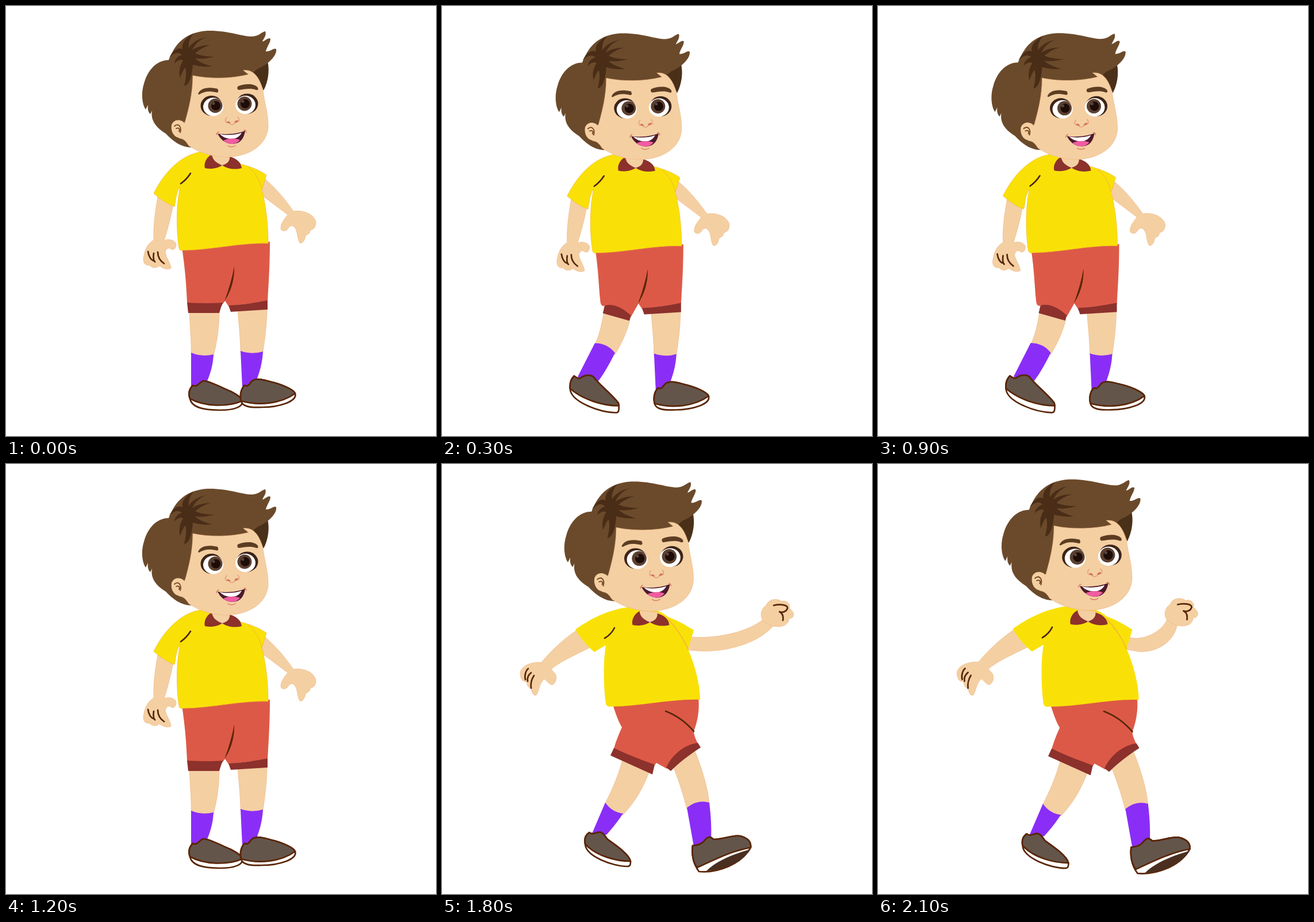
Animation, 748 px wide and 748 px high, one loop 2.4 s. Source, as an HTML page:

```html
<!DOCTYPE html>
<html lang="en">
<head>
<meta charset="utf-8">
<title>Walking boy</title>
<style>
html, body { margin: 0; width: 100%; height: 100%; overflow: hidden; background: #fff; }
svg { display: block; width: 100vw; height: 100vh; }
</style>
</head>
<body>
<svg id="stage" viewBox="0 0 748 748"></svg>
<script>
const SKIN = '#f4cfa2', HAIR = '#6b4a2b', DARK = '#4a2d17', SHIRT = '#f9e107',
  SHORTS = '#dd5947', CUFF = '#8c312c', SOCK = '#8a2ef7', LINE = '#5a2607';

const fill = (color, d, extra = '') => `<path fill="${color}" d="${d}" ${extra}/>`;
const line = (color, width, d) =>
  `<path fill="none" stroke="${color}" stroke-width="${width}" stroke-linecap="round" stroke-linejoin="round" d="${d}"/>`;
const skin = d => fill(SKIN, d, 'stroke="#efb987" stroke-width=".7"');
const cloth = d => fill(SHIRT, d, 'stroke="#f3b52c" stroke-width=".7"');
const oval = (color, x, y, rx, ry = rx) => `<ellipse fill="${color}" cx="${x}" cy="${y}" rx="${rx}" ry="${ry}"/>`;
const group = (transform, body) => `<g transform="${transform}">${body}</g>`;

// top runs heel to toe; seam and sole run back from toe to heel
const shoe = (top, seam, sole) => {
  const edge = `stroke="${LINE}" stroke-width="2.7" stroke-linejoin="round"`;
  return fill('#fff', top + sole + 'Z', edge) + fill('#64554b', top + seam + 'Z', edge);
};

// the lash shows as a dark crescent on the outer side (-1 left, 1 right)
const eye = (x, y, outer, ix, iy) =>
  oval('#3d2418', x + outer * 1.5, y - 1, 19, 17.5) + oval('#fff', x - outer * 1.5, y + 1, 17.5, 16) +
  oval('#5b4031', ix, iy, 12.5) + oval('#1d0c08', ix + 1, iy, 8) +
  oval('#57453c', ix - 3, iy - 4, 2.5);

const head =
  fill('#4a3018', 'M428 113L455 96C459 112 456 132 448 147L438 128Z') +
  fill(HAIR, `M283 94C292 72 306 46 350 43C385 42 410 53 428 53C440 53 446 44 451 44
    C454 51 447 58 446 62C452 60 456 54 460 57C460 64 454 70 452 79C460 80 466 72 470 75
    C472 88 452 104 438 109L420 124L330 130L322 246C305 246 290 235 278 222C262 212 251 200 254 182
    L251 188C247 184 246 179 247 172L243 180C236 170 235 150 240 135C246 112 262 94 283 94Z`) +
  fill(DARK, `M327 47C311 56 305 65 307 75C300 71 291 76 284 90C293 80 301 80 306 85C298 87 293 94 293 100
    C298 94 304 92 308 95C302 104 300 115 303 125C306 116 309 110 312 107C315 119 312 130 310 139
    C320 138 324 118 325 102C335 105 345 106 358 105C347 102 336 98 329 91C341 93 350 91 363 88
    C349 88 337 86 329 82C338 75 346 70 356 68C343 68 331 71 324 77C328 66 339 57 349 54
    C333 57 321 66 318 73C317 64 320 55 327 47Z`) +
  skin(`M325 121C352 127 392 127 422 119L413 112C432 110 441 126 447 146C449 166 456 185 456 208
    C456 240 425 263 380 263C352 261 335 254 318 243C309 228 304 232 300 229L312 200C318 178 325 152 325 121Z`) +
  fill(SKIN, 'M312 205C304 195 291 197 288 207C286 220 294 231 305 229L314 226Z') +
  line('#70411f', 1.8, 'M293 209C300 203 306 210 303 220M296 213C301 211 303 214 301 218') +
  fill('#5d3d22', 'M334 153C338 143 350 140 368 144Q371 150 367 150.5C352 147 344 149 336 154Z') +
  fill('#5d3d22', 'M403 140C414 135 432 134 438 142Q440 147 435 146C425 142 414 145 405 146Q401 145 403 140Z') +
  eye(359, 174.5, -1, 364, 173.5) + eye(418, 171, 1, 415, 170) +
  line('#e29a78', 1.3, 'M384 194C380 198 381 203 386 203M403 193C407 197 406 201 402 202M389 205Q394 208 398 204') +
  fill('#d0705a', 'M384 201Q388 199 391 204Q386 205 384 201ZM397 203Q399 198 404 199Q402 204 397 203Z') +
  fill('#4d1a2c', 'M368 222C382 224 401 223 416 217C414 231 407 240 393 240C381 239 373 232 368 222Z') +
  fill('#fff', 'M372 223C384 225.5 398 224.5 410 220.5C406 228 400 231 392 231C384 231 377 228 372 223Z') +
  fill('#ef5ca0', 'M378 234C387 229.5 400 229.5 407 233C402 239 397 240 393 240C387 240 382 238 378 234Z') +
  line('#cf7a62', 1.4, 'M366 224Q367 220 370 219M414 216Q418 216 418 220M386 243Q392 247 399 243');

const collar =
  skin('M358 257L362 272L376 279L389 272L391 260Z') +
  fill(CUFF, 'M358 258C347 264 344 275 346 282C358 285 371 281 376 277C365 273 359 267 358 258Z') +
  fill(CUFF, 'M389 262C390 269 385 275 376 277C386 284 399 285 410 282C409 272 401 265 389 262Z');

// arms hanging, shirt and right leg shared by the two calm poses
const calmArms =
  skin(`M264 332C259 360 256 385 257 407C248 412 242 422 240 434C237 445 241 452 250 451C255 457 262 456 267 452
    C272 456 281 460 287 456C287 448 278 437 277 428C280 420 284 420 287 423C293 426 296 420 296 414
    C294 407 282 404 275 408C280 392 286 372 291 345Z`) +
  line('#542708', 2.7, 'M247 427C248 435 252 442 257 443M257 430C256 437 257 443 259 445M264 428C264 437 269 444 275 448') +
  skin(`M448 299C470 317 486 337 500 357C518 354 537 363 539 376C539 385 535 389 529 390C529 397 525 396 521 400
    C520 408 515 414 511 412C507 405 507 396 505 390C500 379 494 381 490 388C486 393 479 392 478 387
    C478 377 485 370 490 363L446 330Z`);

const calmShirt =
  cloth(`M345 253C309 256 278 284 257 326Q275 342 293 349C296 337 295 325 303 314C296 345 296 390 301 421Q302 426 308 425
    C355 425 410 411 456 413C456 380 452 345 445 320L453 294C440 285 425 279 408 275C395 262 370 252 345 253Z`) +
  line('#f3b52c', 1, 'M421 280C435 290 442 305 445 320') +
  line('#4b2410', 2.6, 'M304 309C311 304 316 299 321 291') + collar;

const calmRightLeg =
  skin('M403 527C405 555 408 580 408 602Q428 609 447 602C451 575 454 550 454 526Z') +
  fill(SOCK, 'M408 600Q428 607 447 601C446 621 441 638 435 653L411 663Z') +
  shoe('M409 687C406 675 410 665 415 660C423 664 424 654 430 651C438 647 450 651 466 655C484 660 501 668 503 674',
    'C478 692 440 696 409 687', 'C507 688 475 698 445 698C425 699 411 697 409 687');

const calmRightCuff =
  fill(CUFF, 'M387 521Q422 519 455 512L455 528L391 532Z') +
  fill(LINE, 'M397 453C398 475 391 498 380 513C387 495 393 475 397 453Z');

const stand =
  skin('M319 530C320 560 323 585 322 606Q340 613 361 608C367 585 371 560 371 530Z') +
  fill(SOCK, 'M322 603Q340 611 361 606C360 626 355 641 349 655L322 663Z') +
  shoe('M320 683C316 672 320 665 325 660C333 664 336 655 343 652C354 652 375 664 390 670C400 675 410 681 411 687',
    'C385 698 345 697 320 683', 'C413 696 400 703 372 703C345 703 323 699 320 683') +
  calmRightLeg +
  fill(SHORTS, 'M306 420C312 460 314 490 315 517L378 517L381 513L387 522L455 514C457 480 459 450 459 410Z') +
  fill(CUFF, 'M315 516Q350 518 378 516C374 522 373 528 371 534L317 534Z') +
  calmRightCuff + calmArms + calmShirt + head;

const smallStep =
  skin('M321 526C317 550 313 568 305 585L340 602C353 580 362 560 367 538Z') +
  fill(SOCK, 'M305 582Q327 582 340 599C332 615 322 634 311 648L275 641Z') +
  shoe('M262 661C261 650 265 643 269 639C276 644 278 645 284 640C291 637 299 637 303 641C313 655 332 668 346 686L347 691',
    'C318 691 284 680 262 661', 'C347 698 347 703 342 703C312 702 263 684 262 661') +
  calmRightLeg +
  fill(SHORTS, 'M306 420C312 460 312 490 315 512Q317 519 322 517L368 536L381 513L387 522L455 514C457 480 459 450 459 410Z') +
  fill(CUFF, 'M322 517C336 512 353 520 368 534L365 543L319 530Z') +
  calmRightCuff + calmArms + calmShirt + head;

const fist =
  skin(`M500 271C490 262 494 247 503 242C506 232 520 228 530 235C538 232 546 240 543 246C546 250 553 255 550 260
    C550 264 546 264 543 265C541 277 530 281 514 278Z`) +
  line('#542708', 2.7, 'M516 242C527 239 541 241 540 247C538 253 531 255 526 253C532 256 533 262 532 268');

const bentArm = skin('M434 299C455 304 486 292 498 268L515 276C512 303 483 325 450 323L425 319Z') + fist;
const longArm = skin('M433 297C475 300 530 290 559 266L575 279C545 312 480 328 425 319Z') + group('translate(61 0)', fist);

const bigStep = arm =>
  skin('M314 510C305 545 292 570 284 586Q296 605 315 606C335 585 350 560 361 530Z') +
  fill(SOCK, 'M284 585Q296 602 315 604C306 617 298 628 286 641L260 641Z') +
  shoe('M249 657C247 647 250 641 256 637C263 643 270 634 277 637C283 640 284 645 288 649C305 661 325 675 328 687',
    'C303 687 268 678 249 657', 'C328 692 328 696 322 696C298 696 250 679 249 657') +
  skin('M402 522C413 550 420 572 426 596L465 587C462 555 450 520 439 493Z') +
  fill(SOCK, 'M426 594Q444 579 465 585C468 610 469 630 468 652L438 661Z') +
  shoe('M436 660C443 659 449 659 456 652C461 645 466 642 472 649C490 649 505 641 518 643C531 646 538 653 537 663',
    'C505 669 478 682 444 698C437 690 434 675 436 660', 'C521 692 480 708 447 705C437 692 434 675 436 660') +
  fill('#4a2f20', 'M460 704C475 688 505 675 537 666C521 690 485 704 460 704Z') +
  fill(SHORTS, 'M297 414C303 434 308 446 313 454C306 469 302 481 299 491L369 521L373 516L391 526L445 482C441 474 438 467 438 461C446 440 448 420 446 400Z') +
  fill(CUFF, 'M299 490C320 500 347 511 370 519L366 536L293 503Z') +
  fill(CUFF, 'M390 524C398 505 420 484 445 481L450 489C432 501 415 513 398 530Z') +
  line('#542708', 2.6, 'M389 426C410 434 426 447 438 461') +
  skin(`M233 286C208 303 187 324 173 341C155 340 137 347 136 360C136 370 141 376 147 374C148 382 151 386 155 386
    C156 394 160 400 164 398C169 391 169 377 178 370C182 372 186 380 192 380C199 377 200 366 197 361L190 353
    C205 340 228 330 258 315Z`) +
  line('#542708', 2.7, 'M150 352C146 355 143 364 145 371M155 359C150 363 148 369 149 374M160 364C156 370 154 379 155 386') +
  arm +
  fill(SHIRT, `M334 244C290 247 254 268 232 284Q246 307 265 323L285 311C280 342 281 385 285 413Q287 419 293 418
    C345 418 400 404 449 406C449 380 440 346 428 318L438 285C425 277 410 268 393 262C378 249 355 243 334 244Z`) +
  line('#f5bd2d', 2, 'M394 267C408 281 419 298 428 318') +
  line('#4b2410', 2.6, 'M283 299C290 295 296 289 300 281') +
  group('translate(-14.5 -6)', collar) +
  group('translate(-30 -17.5) scale(1.025)', head);

const poses = { stand, smallStep, stride: bigStep(bentArm), reach: bigStep(longArm) };

const HOLD = 300;
const steps = [
  ['stand', ''],
  ['smallStep', 'translate(-39.2 4.5)'],
  ['reach', 'translate(-24.4 16) scale(.9956)'],
  ['smallStep', 'translate(-39.5 4.3)'],
  ['stand', ''],
  ['stride', ''],
  ['reach', 'translate(0 4)'],
  ['stride', 'scale(1.0102)']
];

const stage = document.getElementById('stage');
stage.innerHTML = Object.entries(poses)
  .map(([name, body]) => `<g id="${name}" visibility="hidden">${body}</g>`).join('');

let shown = -1;
function show(index) {
  if (index === shown) return;
  shown = index;
  const [name, transform] = steps[index];
  for (const g of stage.children) g.setAttribute('visibility', g.id === name ? 'visible' : 'hidden');
  document.getElementById(name).setAttribute('transform', transform);
}

const start = performance.now();
function tick() {
  show(Math.floor((performance.now() - start) / HOLD) % steps.length);
  requestAnimationFrame(tick);
}
tick();
</script>
</body>
</html>
```
